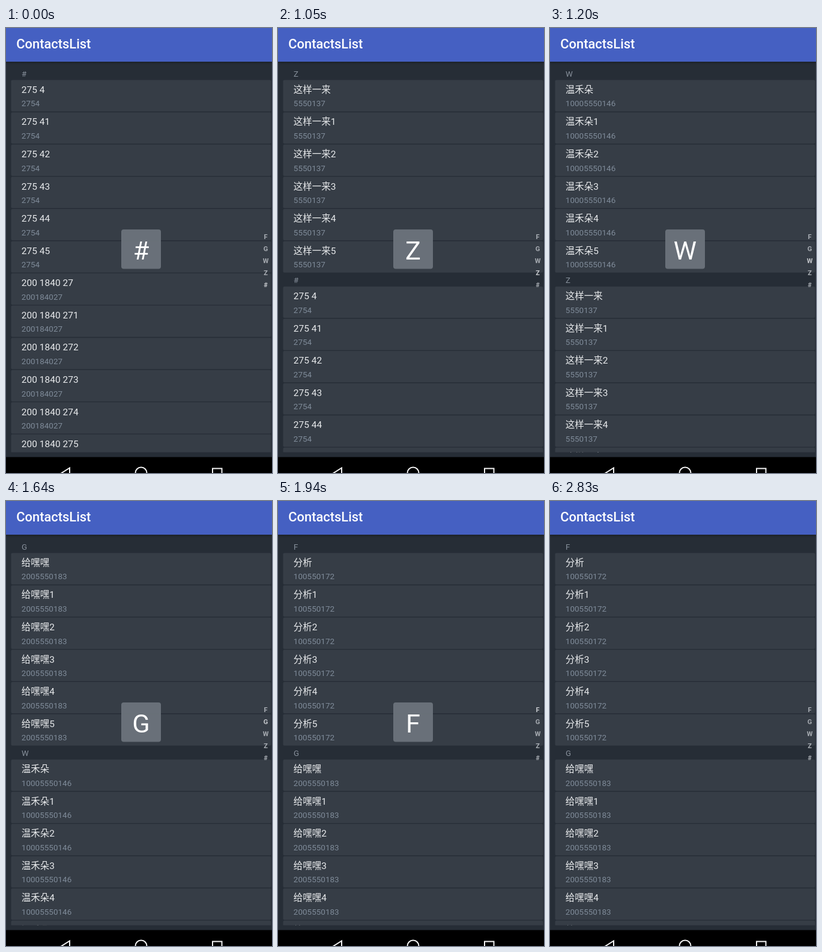
Animation of 443 by 740 pixels, one loop 3270 ms. Source, as an HTML page with a canvas:

```html
<!DOCTYPE html>
<html lang="zh-CN">
<head>
<meta charset="utf-8">
<title>ContactsList</title>
<style>
  html, body { margin: 0; width: 100%; height: 100%; overflow: hidden; background: #000; }
  canvas { display: block; }
</style>
</head>
<body>
<canvas id="stage" width="443" height="740"></canvas>
<script>
const ctx = document.getElementById('stage').getContext('2d');
const FONT = 'Roboto, "Noto Sans CJK SC", "Noto Sans CJK", sans-serif';
const LOOP = 3270;
const ROW = 53.57, CARD = 52.2, HEADER = 21.9;
const LIST_TOP = 86.6, LIST_BOTTOM = 705.5;
const BACKGROUND = '#262d36', CARD_COLOR = '#363d46';

const sections = [
  { letter: 'F', contacts: [['分析', '100550172']] },
  { letter: 'G', contacts: [['给嘿嘿', '2005550183']] },
  { letter: 'W', contacts: [['温禾朵', '10005550146']] },
  { letter: 'Z', contacts: [['这样一来', '5550137']] },
  { letter: '#', contacts: [['275 4', '2754'], ['200 1840 27', '200184027']] },
];

// Time at which the finger reaches each section; null means it was lifted.
const touches = [[0, '#'], [600, 'Z'], [1200, 'W'], [1640, 'G'], [1940, 'F'], [2090, null]];

function text(value, x, y, size, color, weight = 400, align = 'left') {
  ctx.font = `${weight} ${size}px ${FONT}`;
  ctx.textAlign = align;
  ctx.fillStyle = color;
  ctx.fillText(value, x, y);
}

function box(x, y, w, h, color, radius = 0) {
  ctx.fillStyle = color;
  ctx.beginPath();
  ctx.roundRect(x, y, w, h, radius);
  ctx.fill();
}

function drawList(firstLetter) {
  ctx.save();
  ctx.beginPath();
  ctx.rect(0, 56, 443, LIST_BOTTOM - 56);
  ctx.clip();
  let y = LIST_TOP;
  const start = sections.findIndex(s => s.letter === firstLetter);
  for (const { letter, contacts } of sections.slice(start)) {
    text(letter, 26, y - 5.6, 13.3, '#87909b');
    for (const [name, number] of contacts) {
      for (let copy = 0; copy < 6; copy++, y += ROW) {
        box(8.5, y, 433, CARD, CARD_COLOR, 2);
        text(name + (copy || ''), 25.8, y + 21.2, 15.5, '#e9ebed');
        text(number, 25.8, y + 43.8, 13.5, '#7f8b99');
      }
    }
    y += HEADER;
  }
  ctx.restore();
}

function drawIndex(active) {
  sections.forEach(({ letter }, i) => {
    const color = letter === active ? '#c6c9cd' : '#a8adb3';
    text(letter, 432.6, 350.8 + i * 20.15, 11, color, 700, 'center');
  });
}

function drawPopup(letter) {
  box(192, 335, 66, 65.5, 'rgba(108, 115, 123, 0.96)', 4);
  text(letter, 225, 385, 43.2, '#fff', 400, 'center');
}

function drawToolbar() {
  const shadow = ctx.createLinearGradient(0, 56, 0, 61);
  shadow.addColorStop(0, 'rgba(0, 0, 0, 0.25)');
  shadow.addColorStop(1, 'rgba(0, 0, 0, 0)');
  box(0, 56, 443, 5, shadow);
  box(0, 0, 443, 56, '#4560c2');
  text('ContactsList', 17.2, 34.2, 21.9, '#fff', 500);
}

function drawNavigation() {
  box(0, 713.5, 443, 27, '#000');
  ctx.strokeStyle = '#f2f2f2';
  ctx.lineWidth = 2;
  ctx.beginPath();
  ctx.moveTo(91, 741);
  ctx.lineTo(106, 731.5);
  ctx.lineTo(106, 750.5);
  ctx.closePath();
  ctx.moveTo(234.5, 740);
  ctx.arc(225, 740, 9.5, 0, Math.PI * 2);
  ctx.rect(344, 732.5, 15.5, 16);
  ctx.stroke();
}

function draw(now) {
  const time = now % LOOP;
  const active = touches.filter(([at]) => at <= time).pop()[1];
  box(0, 0, 443, 740, BACKGROUND);
  drawList(active ?? 'F');
  drawIndex(active);
  if (active) drawPopup(active);
  drawToolbar();
  drawNavigation();
}

const begin = performance.now();
function tick() {
  draw(performance.now() - begin);
  requestAnimationFrame(tick);
}
tick();
</script>
</body>
</html>
```
